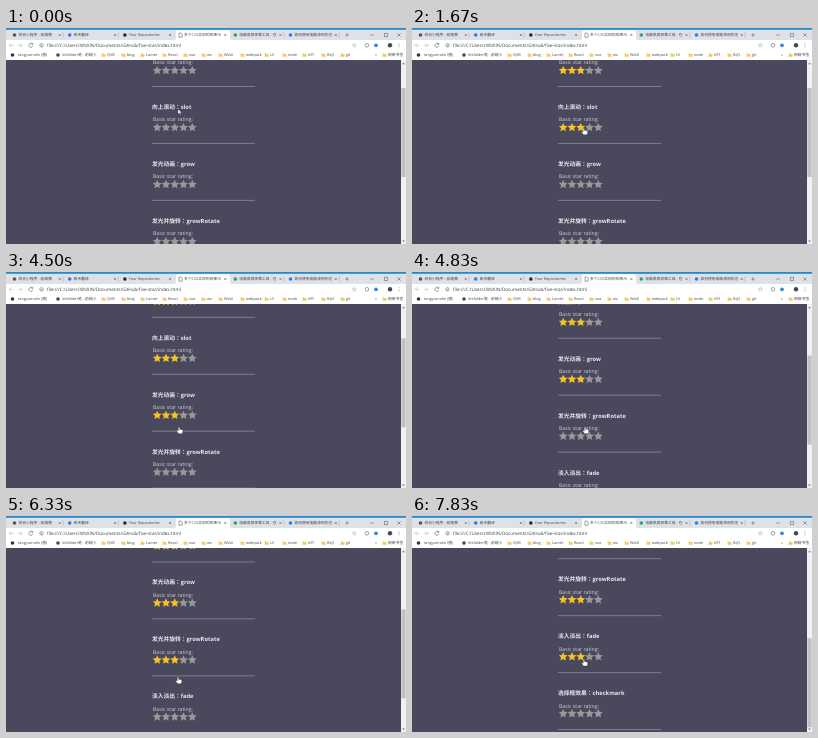
Write an HTML page that moves like this. It is 400 by 216 pixels and loops after 8 s.

```html
<!DOCTYPE html>
<html lang="zh-Hant">
<head>
<meta charset="utf-8">
<title>Star rating</title>
<style>
html, body { margin: 0; width: 100%; height: 100%; overflow: hidden; background: #4a485c; }
svg { display: block; width: 100%; height: 100%; }
text { font-family: "Open Sans", "Noto Sans CJK TC", "Noto Sans CJK", sans-serif; text-rendering: geometricPrecision; white-space: pre; }
.ui { font-size: 3.8px; fill: #44474b; }
.url { font-size: 4.6px; fill: #3a3d41; }
.head { font-size: 5.75px; font-weight: 700; fill: #e9e7ee; }
.label { font-size: 5.2px; fill: #d3d1da; }
.line { fill: none; stroke: #5f6368; stroke-width: .6; }
</style>
</head>
<body>
<svg viewBox="0 0 400 216">
  <defs>
    <clipPath id="view"><rect y="32" width="395" height="184"/></clipPath>
    <clipPath id="slot"><rect x="146" y="-4.7" width="46" height="9.4"/></clipPath>
  </defs>
  <rect width="400" height="216" fill="#4a485c"/>
  <g clip-path="url(#view)"><g id="list"></g></g>
  <g>
    <rect x="395" y="32" width="5" height="184" fill="#f1f1f1"/>
    <path d="M396.2 36.2l1.3-1.5 1.3 1.5zM396.2 212.5l1.3 1.5 1.3-1.5z" fill="#606060"/>
    <rect id="thumb" x="395.4" width="4.2" height="89" fill="#c1c1c1"/>
  </g>
  <g id="chrome">
    <rect width="400" height="32" fill="#fff"/>
    <rect width="400" height="12" fill="#dee1e6"/>
    <rect width="400" height="1.8" fill="#2489d3"/>
    <path d="M168 12q2 0 2-2V4q0-1.8 2-1.8h50q2 0 2 1.8v6q0 2 2 2z" fill="#fff"/>
    <path class="line" stroke-opacity=".45" d="M7.2 17.3H3.3m1.8-1.8-1.8 1.8 1.8 1.8M12 17.3h3.9m-1.8-1.8 1.8 1.8-1.8 1.8"/>
    <path class="line" d="M26.5 16.1a2 2 0 1 0 .3 1.8m0-3v1.5h-1.5"/>
    <circle class="line" cx="35.5" cy="17.3" r="1.7"/>
    <path class="line" d="M35.5 17v1.3M339.3 7h3.4m-1.7-1.7v3.4M364.3 7h3.4M378.4 5.4h3.2v3.2h-3.2zM391.4 5.4l3.2 3.2m0-3.2-3.2 3.2"/>
    <path class="line" d="M393 15.3v.8m0 .8v.8m0 .8v.8"/>
    <circle class="line" cx="361" cy="17.3" r="1.8"/>
    <circle cx="370" cy="17.3" r="1.9" fill="#3c83e0"/>
    <circle cx="384" cy="17.3" r="2.2" fill="#44484d"/>
  </g>
  <g id="pointer">
    <path id="arrow" d="M0 0v5.2l1.3-1.1.9 2 .9-.4-.9-1.9h1.7z" fill="#fff" stroke="#222" stroke-width=".35"/>
    <path id="hand" d="M-.7.5q.7-1 1.4 0v2q.6-.5 1.2.1.6-.4 1.1.2.8-.3.8.6v1.4q0 1-.7 1.9h-3.4L-2 4.5q-.8-1.1.2-1.3l1.1.8z" fill="#fff" stroke="#222" stroke-width=".35"/>
  </g>
</svg>
<script>
const STEP = 500 / 3, LOOP = 8000, TOP = 21.8, PITCH = 56.95;
const $ = id => document.getElementById(id);
const clamp = v => Math.max(0, Math.min(1, v));
const ease = p => p * p * (3 - 2 * p);

function add(parent, tag, attrs, text) {
  const el = document.createElementNS(parent.namespaceURI, tag);
  for (const k in attrs) el.setAttribute(k, attrs[k]);
  if (text) el.textContent = text;
  return parent.appendChild(el);
}

const STAR = 'M' + Array.from({ length: 10 }, (_, i) => {
  const a = i * Math.PI / 5, r = i % 2 ? 2.25 : 4.65;
  return `${(r * Math.sin(a)).toFixed(2)} ${(-r * Math.cos(a)).toFixed(2)}`;
}).join('L') + 'Z';

// Browser frame
const frame = $('chrome');
const write = (x, y, text, cls = 'ui') => add(frame, 'text', { class: cls, x, y }, text);
const dot = (cx, cy, fill) => add(frame, 'circle', { cx, cy, r: 1.8, fill });

const tabs = [
  ['综合小程序 - 前端教', '#555'], ['青禾翻译', '#2d7be5'], ['Your Repositories', '#24292e'],
  ['多个CSS实现的效果示', '#8a8d91'], ['电脑录屏录像工具 - 在', '#21a576'], ['如何使用电脑录用的注', '#2f7de1']
];
tabs.forEach(([name, color], i) => {
  const x = 7 + i * 55.2;
  if (i === 3) add(frame, 'path', { class: 'line', d: `M${x + .4} 5h2.2l1 1v3.2h-3.2z` });
  else dot(x + 1.5, 7, color);
  write(x + 5.4, 8.4, name);
  add(frame, 'path', { class: 'line', d: `M${x + 45.7} 6l2 2m0-2-2 2` });
  if (i !== 2 && i !== 3) add(frame, 'path', { class: 'line', d: `M${x + 50} 4.5v5`, 'stroke-opacity': .4 });
});
write(41, 18.9, 'file:///C:/Users/XINXIN/Documents/GitHub/five-star/index.html', 'url');
add(frame, 'path', { class: 'line', d: STAR, transform: 'translate(348.3 17.4) scale(.45)', 'stroke-width': 1.2 });

dot(6.5, 27, '#33373c');
write(12, 28.4, 'tangyumolin (唐)');
dot(52, 27, '#3f4a5c');
write(56, 28.4, 'Inkfolder笔 - 前端小');
[['QVB', 101], ['blog', 121], ['Lumet', 140], ['React', 162], ['vue', 183], ['wx', 201], ['WeUI', 218],
 ['webpack', 240], ['UI', 264], ['node', 282], ['API', 302], ['RxJS', 321], ['git', 340], ['网络书签', 382]
].forEach(([name, x]) => {
  add(frame, 'path', { d: `M${x - 5.4} 25.3h1.5l.5.6h2v2.9h-4z`, fill: '#f3cc62' });
  write(x, 28.4, name);
});
write(369, 28.2, '»');

// Rating list
const sections = [
  { title: '', on: 660, effect: 'fade' },
  { title: '向上滚动：slot', on: 1160, effect: 'slot' },
  { title: '发光动画：grow', on: 2660, effect: 'grow' },
  { title: '发光并旋转：growRotate', on: 5160, effect: 'growRotate' },
  { title: '淡入淡出：fade', on: 6560, effect: 'fade' },
  { title: '选择框效果：checkmark', on: Infinity, effect: 'fade' }
];
const starX = i => 151.2 + i * 8.77;
sections.forEach((s, k) => {
  const g = add($('list'), 'g', { transform: `translate(0 ${TOP + k * PITCH})` });
  add(g, 'text', { class: 'head', x: 146, y: 2.2 }, s.title);
  add(g, 'text', { class: 'label', x: 147, y: 14.7 }, 'Basic star rating:');
  add(g, 'path', { d: 'M146 36.7h103', stroke: '#9694a0', 'stroke-width': .7 });
  const row = add(g, 'g', { transform: 'translate(0 20.8)' });
  if (s.effect === 'slot') row.setAttribute('clip-path', 'url(#slot)');
  const star = (i, fill) => add(row, 'path', { d: STAR, fill, transform: `translate(${starX(i)} 0)` });
  s.grey = [0, 1, 2, 3, 4].map(i => star(i, '#999'));
  s.gold = [0, 1, 2].map(i => star(i, '#f5c225'));
});

function drawStars({ on, effect, grey, gold }, t) {
  const p = ease(clamp((t - on) / 500));
  gold.forEach((el, i) => {
    let y = 0, size = 1, turn = 0, alpha = p;
    if (effect === 'slot') {
      y = 9.4 * (1 - p);
      alpha = 1;
      grey[i].setAttribute('transform', `translate(${starX(i)} ${y - 9.4})`);
    } else {
      if (effect !== 'fade') size = 1 + .45 * Math.sin(Math.PI * p);
      if (effect === 'growRotate') turn = 360 * p;
      grey[i].setAttribute('opacity', 1 - p * p);
    }
    el.setAttribute('transform', `translate(${starX(i)} ${y}) rotate(${turn}) scale(${size})`);
    el.setAttribute('opacity', alpha);
  });
}

// Each key: time, then values
const pointerKeys = [
  [0, 172, 81], [170, 172, 80], [670, 170.5, 43], [900, 170.5, 43], [1330, 171.8, 100], [2170, 171.8, 100],
  [2830, 172.5, 155], [4830, 173, 155], [5170, 172, 161], [6500, 172, 161], [7000, 172.4, 144.3], [7330, 171.9, 143.3]
];
const scrollKeys = [[4330, 0], [4830, 49.2], [6170, 49.2], [6330, 69.5], [6500, 105], [6670, 129.7]];

function track(keys, t) {
  const n = keys.findIndex(k => k[0] > t);
  if (n === 0) return keys[0].slice(1);
  if (n < 0) return keys[keys.length - 1].slice(1);
  const a = keys[n - 1], b = keys[n], p = ease((t - a[0]) / (b[0] - a[0]));
  return a.slice(1).map((v, i) => v + (b[i + 1] - v) * p);
}

// The picture advances six times a second
function draw(ms) {
  const t = Math.round(Math.floor((ms % LOOP + 4) / STEP) * STEP / 10) * 10;
  const [scroll] = track(scrollKeys, t), [x, y] = track(pointerKeys, t);
  $('list').setAttribute('transform', `translate(0 ${-scroll})`);
  $('thumb').setAttribute('y', 60 + scroll * .48);
  sections.forEach(s => drawStars(s, t));
  $('pointer').setAttribute('transform', `translate(${x} ${y})`);
  const link = t > 2500 || sections.some((_, k) => Math.abs(y + scroll - (TOP + 20.8 + k * PITCH)) < 9);
  $('hand').setAttribute('display', link ? 'inline' : 'none');
  $('arrow').setAttribute('display', link ? 'none' : 'inline');
}

const start = performance.now();
(function tick() {
  draw(performance.now() - start);
  requestAnimationFrame(tick);
})();
</script>
</body>
</html>
```
